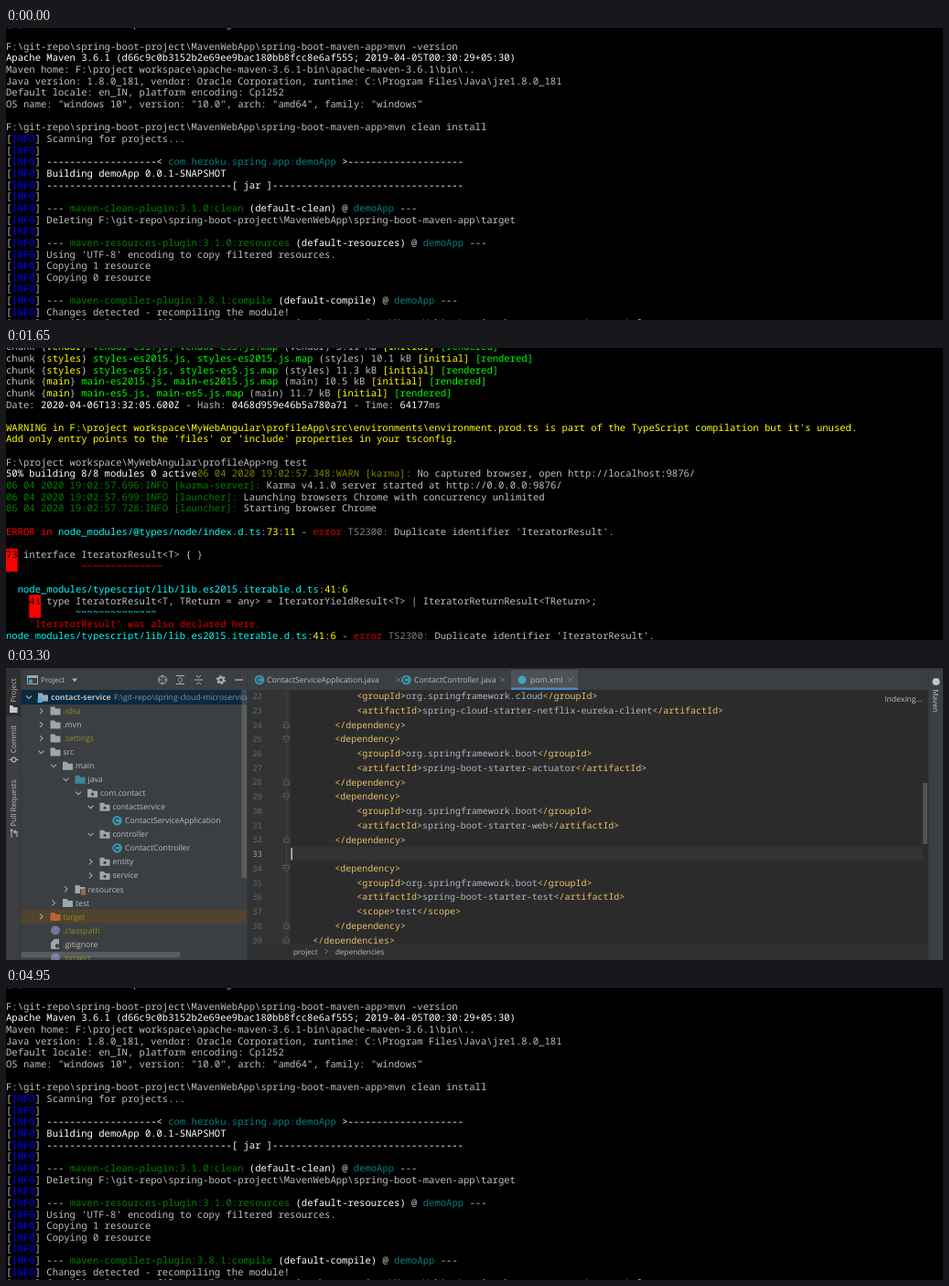
These frames come from a looping animation (1024 by 320 pixels, 4970 ms). An HTML page:

```html
<!DOCTYPE html>
<html lang="en">
<head>
<meta charset="utf-8">
<title>Developer screens</title>
<style>
  html, body { margin: 0; width: 100%; height: 100%; overflow: hidden; background: #000; }
  svg { display: block; }
  text { white-space: pre; text-rendering: geometricPrecision; }
  .term { font: 500 10.55px "Noto Sans Mono", "DejaVu Sans Mono", monospace; }
  .code { font: 500 9.975px "Noto Sans Mono", "DejaVu Sans Mono", monospace; }
  .ui { font: 8.65px "Open Sans", "Noto Sans", sans-serif; fill: #bbb; }
  .small { font-size: 8.2px; }
  .bold { font-weight: 700; }
</style>
</head>
<body>
<svg id="stage" width="100%" height="100%" viewBox="0 0 1024 320"><g id="reel"></g></svg>
<script>
const W = 1024, H = 320;
const reel = document.getElementById('reel');

function add(parent, tag, attrs, content) {
  const node = document.createElementNS('http://www.w3.org/2000/svg', tag);
  for (const key in attrs) node.setAttribute(key, attrs[key]);
  if (content !== undefined) node.textContent = content;
  return parent.appendChild(node);
}
const rect = (p, x, y, width, height, fill) => add(p, 'rect', { x, y, width, height, fill });
const dot = (p, cx, cy, r, fill) => add(p, 'circle', { cx, cy, r, fill });
const line = (p, d, stroke = '#afb1b3', width = 1) =>
  add(p, 'path', { d, stroke, 'stroke-width': width, fill: 'none' });
const shape = (p, d, fill) => add(p, 'path', { d, fill });

function panel(index, bg) {
  const p = add(reel, 'svg', { x: 0, y: index * H, width: W, height: H, overflow: 'hidden' });
  rect(p, 0, 0, W, H, bg);
  return p;
}

// ---- Terminals: "^x" switches the text colour ----
const COL = 6.33, ROW = 12.65;
const INK = {
  d: '#c0c0c0', w: '#fff', b: '#00f', g: '#008000', c: '#008080', y: '#ff0',
  G: '#0f0', o: '#808000', r: '#f00', R: '#d80000', C: '#0ff', k: '#808080', x: '#000'
};

function terminal(p, firstRow, source) {
  source.split('\n').forEach((row, i) => {
    const parts = row.split(/\^(.)/);
    const y = firstRow + i * ROW;
    let col = 0, ink = 'd';
    parts.forEach((part, j) => {
      if (j % 2) { ink = part; return; }
      if (part.trim()) {
        const lead = part.length - part.trimStart().length;
        if (ink === 'x') rect(p, col * COL, y - ROW / 2, part.length * COL, ROW * 2, '#f00');
        add(p, 'text', { class: 'term', x: (col + lead) * COL, y: y + 3.8, fill: INK[ink] }, part.trim());
      }
      col += part.length;
    });
  });
}

const dash = n => '-'.repeat(n);
const info = s => '[^bINFO^d] ' + s;
const plugin = (name, id) => info(`--- ^g${name} ^w(${id})^d @ ^cdemoApp^d ---`);
const repo = String.raw`F:\git-repo\spring-boot-project\MavenWebApp\spring-boot-maven-app`;

terminal(panel(0, '#000'), 20 - 2 * ROW, [
  '(c) 2019 Microsoft Corporation. All rights reserved.',
  '',
  repo + '>mvn -version',
  '^wApache Maven 3.6.1 (d66c9c0b3152b2e69ee9bac180bb8fcc8e6af555; 2019-04-05T00:30:29+05:30)',
  String.raw`Maven home: F:\project workspace\apache-maven-3.6.1-bin\apache-maven-3.6.1\bin\..`,
  String.raw`Java version: 1.8.0_181, vendor: Oracle Corporation, runtime: C:\Program Files\Java\jre1.8.0_181`,
  'Default locale: en_IN, platform encoding: Cp1252',
  'OS name: "windows 10", version: "10.0", arch: "amd64", family: "windows"',
  '',
  repo + '>mvn clean install',
  info('Scanning for projects...'),
  info(''),
  info(`^w${dash(19)}< ^ccom.heroku.spring.app:demoApp^w >${dash(20)}`),
  info('^wBuilding demoApp 0.0.1-SNAPSHOT'),
  info(`^w${dash(32)}[ jar ]${dash(33)}`),
  info(''),
  plugin('maven-clean-plugin:3.1.0:clean', 'default-clean'),
  info('Deleting ' + repo + '\\target'),
  info(''),
  plugin('maven-resources-plugin:3.1.0:resources', 'default-resources'),
  info("Using 'UTF-8' encoding to copy filtered resources."),
  info('Copying 1 resource'),
  info('Copying 0 resource'),
  info(''),
  plugin('maven-compiler-plugin:3.8.1:compile', 'default-compile'),
  info('Changes detected - recompiling the module!'),
  info('Compiling 2 source files to ' + repo + '\\target\\classes')
].join('\n'));

const chunk = (name, es, size) =>
  `chunk {^y${name}^d} ^G${name}-${es}.js, ${name}-${es}.js.map^d (${name}) ${size} ^y[initial]^G [rendered]`;
const karma = (ms, who, msg) => `^g06 04 2020 19:02:57.${ms}:INFO [${who}]: ^d${msg}`;
const failure = (file, row, col) =>
  `^C${file}^d:^y${row}^d:^y${col}^d - ^Rerror^k TS2300: ^dDuplicate identifier 'IteratorResult'.`;
const iterable = 'node_modules/typescript/lib/lib.es2015.iterable.d.ts';
const wave = '~'.repeat(14);

terminal(panel(1, '#000'), 11.1 - ROW, [
  chunk('vendor', 'es5', '3.11 MB'),
  chunk('styles', 'es2015', '10.1 kB'),
  chunk('styles', 'es5', '11.3 kB'),
  chunk('main', 'es2015', '10.5 kB'),
  chunk('main', 'es5', '11.7 kB'),
  'Date: ^w2020-04-06T13:32:05.600Z^d - Hash: ^w0468d959e46b5a780a71^d - Time: ^w64177^dms',
  '',
  String.raw`^yWARNING in F:\project workspace\MyWebAngular\profileApp\src\environments\environment.prod.ts is part of the TypeScript compilation but it's unused.`,
  "^yAdd only entry points to the 'files' or 'include' properties in your tsconfig.",
  '',
  String.raw`F:\project workspace\MyWebAngular\profileApp>ng test`,
  '^w50% building 8/8 modules 0 active^o06 04 2020 19:02:57.348:WARN [karma]: ^dNo captured browser, open http://localhost:9876/',
  karma(696, 'karma-server', 'Karma v4.1.0 server started at http://0.0.0.0:9876/'),
  karma(699, 'launcher', 'Launching browsers Chrome with concurrency unlimited'),
  karma(728, 'launcher', 'Starting browser Chrome'),
  '',
  '^rERROR in ' + failure('node_modules/@types/node/index.d.ts', 73, 11),
  '',
  '^x73^d interface IteratorResult<T> { }',
  ' '.repeat(13) + '^r' + wave,
  '',
  `  ^C${iterable}^d:^y41^d:^y6`,
  '    ^x41^d type IteratorResult<T, TReturn = any> = IteratorYieldResult<T> | IteratorReturnResult<TReturn>;',
  ' '.repeat(12) + '^C' + wave,
  "    ^R'IteratorResult' was also declared here.",
  failure(iterable, 41, 6)
].join('\n'));

// ---- IDE ----
const ide = panel(2, '#3c3f41');
const GREY = '#9aa7b0', OLIVE = '#8f8f20', THUMB = 'rgba(166,166,166,.28)';

function label(x, y, text, cls = '', fill) {
  const node = add(ide, 'text', { class: 'ui ' + cls, x, y: y + 3.1 }, text);
  if (fill) node.style.fill = fill;
}
function sideLabel(x, y, text, turn) {
  add(ide, 'text', {
    class: 'ui small', 'text-anchor': 'middle', transform: `translate(${x} ${y}) rotate(${turn})`, y: 3
  }, text);
}
function chevron(x, y, open) {
  line(ide, open ? `M${x - 3} ${y - 1.5}l3 3l3 -3` : `M${x - 1.5} ${y - 3}l3 3l-3 3`, '#a5a8aa', 1.1);
}
function folder(x, y, fill) {
  shape(ide, `M${x - 5.5} ${y - 4.5}h4.5l1.5 2h5v7h-11z`, fill);
}
function classIcon(x, y) {
  dot(ide, x, y, 5.3, '#3e93ad');
  line(ide, `M${x + 1.8} ${y - 1.6}a2.5 2.5 0 1 0 0 3.2`, '#23343b', 1.1);
}
const icons = {
  folder: (x, y) => folder(x, y, GREY),
  java: (x, y) => folder(x, y, '#3e86a0'),
  target: (x, y) => folder(x, y, '#b5652f'),
  module(x, y) { folder(x, y, GREY); rect(ide, x - 6, y + 1, 5, 5, '#40b6e0'); },
  pack(x, y) { folder(x, y, GREY); dot(ide, x, y + 1, 1.6, '#3c3f41'); },
  res(x, y) {
    folder(x, y, GREY);
    rect(ide, x, y, 6, 6, '#3c3f41');
    line(ide, `M${x + 1} ${y + 1.5}h5m-5 2h5m-5 2h5`, '#d9a343');
  },
  cls: classIcon,
  ball: (x, y) => dot(ide, x, y, 5, '#77749b'),
  file(x, y) {
    shape(ide, `M${x - 1} ${y - 5.5}h5v11h-9v-7z`, GREY);
    dot(ide, x + 2, y + 2, 2.2, '#3c3f41');
  }
};

// Project tree
rect(ide, 16, 24, 248, 16, '#0d293e');
rect(ide, 16, 264.5, 248, 15, '#51432f');
// depth, icon, label, branch state (+ closed, - open), muted
const tree = [
  [0, 'module', 'contact-service', '-'],
  [1, 'folder', '.idea', '+', 1],
  [1, 'folder', '.mvn', '+'],
  [1, 'folder', '.settings', '+', 1],
  [1, 'folder', 'src', '-'],
  [2, 'folder', 'main', '-'],
  [3, 'java', 'java', '-'],
  [4, 'pack', 'com.contact', '-'],
  [5, 'pack', 'contactservice', '-'],
  [6, 'cls', 'ContactServiceApplication'],
  [5, 'pack', 'controller', '-'],
  [6, 'cls', 'ContactController'],
  [5, 'pack', 'entity', '+'],
  [5, 'pack', 'service', '+'],
  [3, 'res', 'resources', '+'],
  [2, 'folder', 'test', '+'],
  [1, 'target', 'target', '+', 1],
  [1, 'ball', '.classpath', '', 1],
  [1, 'file', '.gitignore'],
  [1, 'ball', '.project', '', 1]
];
tree.forEach(([depth, icon, name, branch, muted], i) => {
  const x = 49 + depth * 13.5, y = 32 + i * 15.03;
  if (branch) chevron(x - 24, y, branch === '-');
  icons[icon](x - 8.5, y);
  label(x, y, name, depth ? '' : 'bold', muted && OLIVE);
});
label(118, 32, 'F:\\git-repo\\spring-cloud-microservices', '', '#8b9298');
rect(ide, 257.5, 24, 6, 206, THUMB);
rect(ide, 16, 311, 174, 6.5, THUMB);

// Tool window header
line(ide, 'M23.5 8.5h11v9h-11z', GREY);
rect(ide, 23, 8, 12, 3, GREY);
rect(ide, 25, 12.5, 4, 4, '#40a0c4');
label(38, 13, 'Project', 'small');
shape(ide, 'M72 11.5h6l-3 4z', '#afb1b3');
add(ide, 'circle', { cx: 171, cy: 13, r: 4.5, stroke: '#afb1b3', fill: 'none' });
line(ide, 'M171 8v3.5m0 3v3.5m-5 -5h3.5m3 0h3.5');
line(ide, 'M186 8.5h9m-9 9h9m-7 -4.8l2.5 -2.4l2.5 2.4m-5 .8l2.5 2.4l2.5 -2.4');
line(ide, 'M206 13h9m-7 -5l2.5 2.5l2.5 -2.5m-5 10l2.5 -2.5l2.5 2.5');
add(ide, 'circle', { cx: 235, cy: 13, r: 2.7, stroke: '#afb1b3', 'stroke-width': 2, fill: 'none' });
add(ide, 'circle', {
  cx: 235, cy: 13, r: 4.3, stroke: '#afb1b3', 'stroke-width': 1.6, 'stroke-dasharray': '2.25 2.25', fill: 'none'
});
line(ide, 'M250 13h9', '#afb1b3', 1.3);

// Editor
rect(ide, 264, 0, 744, H, '#2b2b2b');
rect(ide, 264, 24, 47, 278, '#313335');
const LINE = 15.73, codeY = n => 30.6 + (n - 22) * LINE;
rect(ide, 264, codeY(33) - LINE / 2, 738, LINE, '#323232');

const tag = (name, value) => `            <${name}>${value}</${name}>`;
const open = '        <dependency>', close = '        </dependency>';
const dependency = (group, artifact) =>
  [tag('groupId', 'org.springframework.' + group), tag('artifactId', 'spring-' + artifact)];
const code = [
  ...dependency('cloud', 'cloud-starter-netflix-eureka-client'), close,
  open, ...dependency('boot', 'boot-starter-actuator'), close,
  open, ...dependency('boot', 'boot-starter-web'), close,
  '',
  open, ...dependency('boot', 'boot-starter-test'), tag('scope', 'test'), close,
  '    </dependencies>'
];
line(ide, 'M306.5 24V302', '#454748', 0.8);
code.forEach((row, i) => {
  const n = 22 + i, y = codeY(n);
  add(ide, 'text', {
    class: 'code', x: 280, y: y + 3.5, 'text-anchor': 'end', fill: n === 33 ? '#a4a3a3' : '#65686b',
    style: 'font-size:9px'
  }, n);
  if (/depend/.test(row)) {
    const up = row.includes('/') ? -1 : 1;
    add(ide, 'path', {
      d: `M303.5 ${y - 3 * up}h6v${4 * up}l-3 ${2.5 * up}l-3 ${-2.5 * up}zm1.5 ${3 * up}h3`,
      fill: '#313335', stroke: '#686b6d', 'stroke-width': 0.8
    });
  }
  const body = row.trimStart();
  const text = add(ide, 'text', { class: 'code', x: 311.4 + (row.length - body.length) * 5.985, y: y + 3.6 });
  body.split(/(<[^>]*>)/).forEach(part => {
    if (part) add(text, 'tspan', { fill: part[0] === '<' ? '#e8bf6a' : '#a9b7c6' }, part);
  });
});
rect(ide, 311.5, codeY(33) - 6.5, 1.4, 13, '#ccc');
rect(ide, 1002, 126, 5, 67, '#505253');
label(960, 34, 'Indexing...');

// Breadcrumbs
rect(ide, 264, 302, 744, 18, '#2f3031');
label(314, 310.5, 'project', 'small');
line(ide, 'M349 308l2.3 2.5l-2.3 2.5', '#8a8d8f', 0.9);
label(360, 310.5, 'dependencies', 'small');

// Editor tabs
rect(ide, 264, 0, 744, 24, '#3c3f41');
rect(ide, 552, 2, 73, 22, '#4e5254');
rect(ide, 552, 21.5, 73, 2.5, '#4a88c7');
const cross = x => line(ide, `M${x - 2.5} 10.5l5 5m0 -5l-5 5`, '#777a7c', 0.9);
classIcon(277, 13);
label(285, 13, 'ContactServiceApplication.java');
cross(429);
classIcon(437.5, 13);
label(446, 13, 'ContactController.java');
cross(543);
dot(ide, 564, 13, 4.5, '#4a9fc8');
label(573, 13, 'pom.xml');
cross(617);

// Side stripes
rect(ide, 0, 0, 16, 53, '#2d2f30');
rect(ide, 15.5, 0, 0.8, H, '#323232');
rect(ide, 263.5, 0, 0.8, H, '#323232');
rect(ide, 1007.5, 0, 0.8, H, '#323232');
sideLabel(8, 24.5, 'Project', -90);
shape(ide, 'M4 49v-8h3l1.5 2h4v6z', '#c4c6c8');
sideLabel(8, 78, 'Commit', -90);
add(ide, 'circle', { cx: 8.5, cy: 100.5, r: 2.4, stroke: '#afb1b3', 'stroke-width': 1.2, fill: 'none' });
line(ide, 'M3.5 100.5h2.6m4.8 0h2.6', '#afb1b3', 1.2);
sideLabel(8, 148, 'Pull Requests', -90);
line(ide, 'M6 178v8m6 -1v-5.5h-3m1.5 -2l-2 2l2 2', '#afb1b3', 1.1);
rect(ide, 4.7, 176.5, 2.6, 2.6, '#afb1b3');
dot(ide, 1016.5, 15, 4, '#c0c2c4');
sideLabel(1015.5, 36, 'Maven', 90);
rect(ide, 0, 0, W, 1.5, '#323436');

// Repeat the first screen so the last scroll closes the loop
reel.appendChild(reel.firstChild.cloneNode(true)).setAttribute('y', 3 * H);

// ---- Motion: hold, then ten ease-out scroll steps per screen ----
const LOOP = 4970, SCENE = 1650, HOLD = 750, STEP = 100;

function draw() {
  const t = performance.now() % LOOP;
  const scene = Math.floor(t / SCENE);
  const k = Math.max(0, Math.floor((t % SCENE - HOLD) / STEP) + 1);
  const shift = Math.round(H * (1 - (1 - k / 10) ** 2));
  reel.setAttribute('transform', `translate(0 ${-scene * H - shift})`);
  requestAnimationFrame(draw);
}
draw();
</script>
</body>
</html>
```
